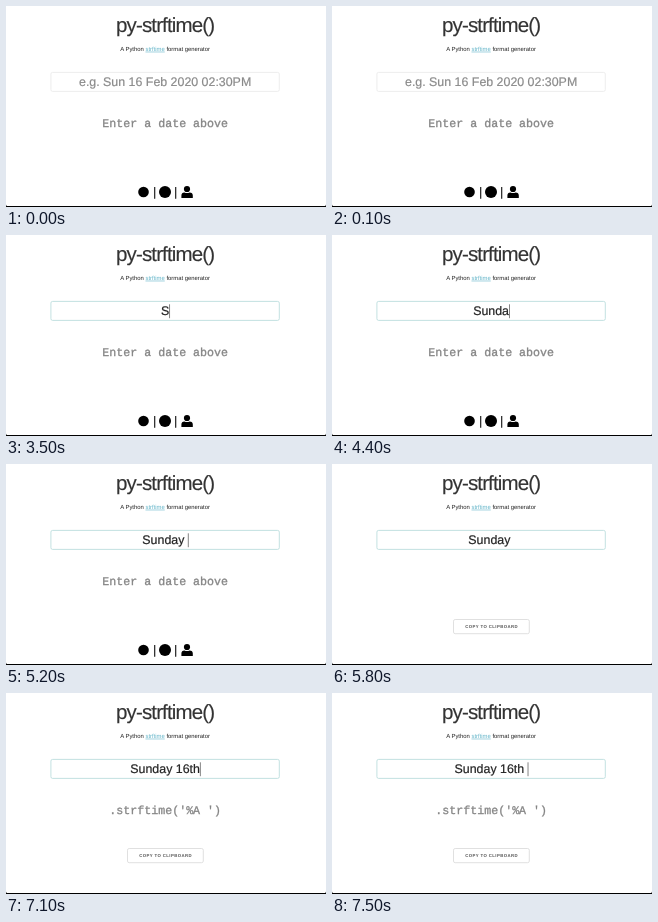
Recreate the animation shown at these times as an HTML page. Size 320x201 px, loop 8000 ms.

```html
<!DOCTYPE html>
<html lang="en">
<head>
<meta charset="utf-8">
<title>py-strftime()</title>
<style>
  html, body { margin: 0; width: 100%; height: 100%; overflow: hidden; background: #fff; }
  svg { display: block; width: 100%; height: 100%; }
  text { font-family: "Liberation Sans", Arial, sans-serif; fill: #222; white-space: pre; text-rendering: geometricPrecision; }
  .mid { text-anchor: middle; }
  .title { font-size: 20.5px; letter-spacing: -.85px; fill: #333; stroke: #333; stroke-width: .15; }
  .sub { font-size: 5.9px; }
  .link { fill: #62b4c8; text-decoration: underline; }
  .entry, .bar { font-size: 12.4px; }
  .entry { stroke-width: .2; }
  .bar { stroke: #222; stroke-width: .2; }
  .output { font-family: "Liberation Mono", "Courier New", monospace; font-size: 11.65px; fill: #858585; stroke: #858585; stroke-width: .3; }
  .copy { font-size: 4.3px; font-weight: bold; letter-spacing: .4px; fill: #555; }
  .box { fill: #fff; stroke-width: .8; }
</style>
</head>
<body>
<svg viewBox="0 0 320 201">
  <text class="title mid" x="159.1" y="26">py-strftime()</text>
  <text class="sub mid" x="159.1" y="44.7">A Python <tspan class="link">strftime</tspan> format generator</text>

  <rect id="field" class="box" x="44.9" y="66.4" width="228.4" height="19" rx="1.7"/>
  <text id="entry" class="entry" y="80.1"></text>
  <rect id="caret" y="69.3" width=".8" height="13.9" fill="#666"/>

  <text id="output" class="output mid" x="159.2" y="121"></text>

  <g id="button">
    <rect class="box" x="121.5" y="155.5" width="75.8" height="14.2" rx="1.7" stroke="#d8d8d8"/>
    <text class="copy mid" x="159.6" y="164.3">COPY TO CLIPBOARD</text>
  </g>

  <g id="footer">
    <circle cx="137.5" cy="186" r="5.3"/>
    <text class="bar mid" x="148.5" y="190">|</text>
    <circle cx="159" cy="186" r="6"/>
    <text class="bar mid" x="169.5" y="190">|</text>
    <circle cx="181" cy="183" r="3.1"/>
    <path d="M175.4 191.9V189.6Q175.4 186.7 178.4 186.6Q181 187.6 183.6 186.6Q186.8 186.7 186.8 189.6V191.9Z"/>
  </g>

  <path d="M0 198.5Q0 200 1.5 200H318.5Q320 200 320 198.5V201H0Z"/>
</svg>
<script>
  const LOOP = 8000, CENTER = 159.1;
  const FOCUS = 2600, SWAP = 5800;
  const HINT = 'e.g. Sun 16 Feb 2020 02:30PM';
  const TYPED = 'Sunday 16th ';
  const KEYS = [3500, 3700, 3800, 4100, 4400, 4700, 5200, 6200, 6600, 6900, 7100, 7500];
  const $ = id => document.getElementById(id);
  const field = $('field'), entry = $('entry'), caret = $('caret');
  const output = $('output'), button = $('button'), footer = $('footer');

  const show = (el, on) => el.setAttribute('visibility', on ? 'visible' : 'hidden');

  function drawField(t) {
    const count = KEYS.filter(k => k <= t).length;
    const focused = t >= FOCUS;
    entry.textContent = count ? TYPED.slice(0, count) : HINT;
    entry.style.fill = entry.style.stroke = count ? '#222' : '#8a8a8a';
    field.setAttribute('stroke', focused ? '#b4dada' : '#e9e9e9');

    const width = entry.getComputedTextLength();
    entry.setAttribute('x', CENTER - width / 2);

    // The caret restarts its blink on focus and on every key
    const since = t - (count ? KEYS[count - 1] : FOCUS);
    show(caret, focused && since % 1000 < 500);
    caret.setAttribute('x', CENTER + (count ? width / 2 : 0));
  }

  function drawOutput(t) {
    const done = t >= SWAP;
    output.textContent = done ? ".strftime('%A ')" : 'Enter a date above';
    // Fade out and back in, in 100 ms steps
    const step = Math.floor(t / 100) - SWAP / 100;
    output.setAttribute('opacity', Math.min(1, Math.abs(step) / 2));
    show(button, done);
    show(footer, !done);
  }

  const start = performance.now();
  function frame() {
    const t = (performance.now() - start) % LOOP;
    drawField(t);
    drawOutput(t);
    requestAnimationFrame(frame);
  }
  frame();
</script>
</body>
</html>
```
